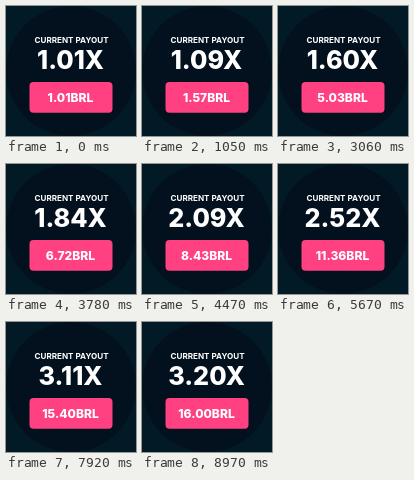
An HTML page with a canvas for the animation above (9 s loop, 130 by 130 pixels).

```html
<!DOCTYPE html>
<html lang="en">
<head>
<meta charset="utf-8">
<title>Current payout</title>
<style>
html, body { margin: 0; width: 100%; height: 100%; overflow: hidden; background: #021a26; }
canvas { display: block; width: 130px; height: 130px; }
</style>
</head>
<body>
<canvas id="stage"></canvas>
<script>
const SIZE = 130, LOOP = 9000, STEP = 30;
const canvas = document.getElementById('stage');
const ctx = canvas.getContext('2d');
const ratio = window.devicePixelRatio || 1;
canvas.width = canvas.height = SIZE * ratio;
ctx.scale(ratio, ratio);

const smooth = p => p * p * (3 - 2 * p);
const mix = (a, b, p) => a + (b - a) * p;

function text(str, x, y, size, weight) {
  ctx.font = `${weight} ${size}px Inter, "Open Sans", sans-serif`;
  ctx.fillText(str, x, y);
}

function draw(ms) {
  const p = smooth(Math.floor((ms % LOOP) / STEP) * STEP / LOOP);

  ctx.fillStyle = '#021a26';
  ctx.fillRect(0, 0, SIZE, SIZE);
  ctx.fillStyle = '#03111e';
  ctx.beginPath();
  ctx.arc(65, 65, 65, 0, Math.PI * 2);
  ctx.fill();

  ctx.fillStyle = '#ff4081';
  ctx.beginPath();
  ctx.roundRect(23.5, 76, 83, 30.7, 4);
  ctx.fill();

  ctx.fillStyle = '#fff';
  ctx.textAlign = 'center';
  text('CURRENT PAYOUT', 65.5, 37, 8.1, 700);
  text(mix(1.01, 3.2, p).toFixed(2) + 'X', 64.5, 62.5, 25.2, 800);
  text(mix(1.01, 16, p).toFixed(2) + 'BRL', 64.5, 95.5, 12.1, 800);
}

function tick(now) {
  draw(now);
  requestAnimationFrame(tick);
}
draw(0);
requestAnimationFrame(tick);
</script>
</body>
</html>
```
